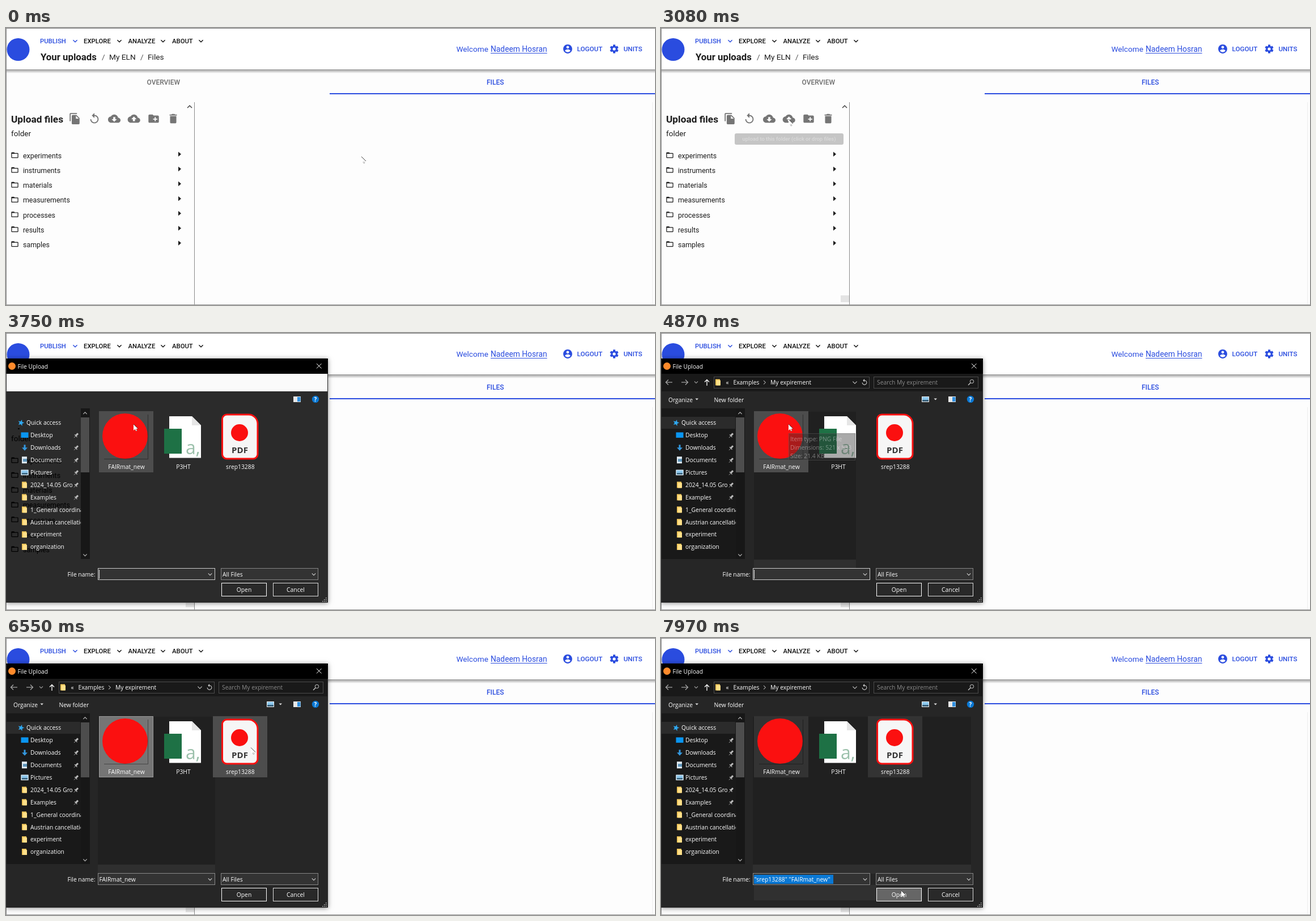
Animation of 1145x489 px, one loop 8000 ms. Source, as an HTML page with a canvas:

```html
<!DOCTYPE html>
<html lang="en">
<head>
<meta charset="utf-8">
<title>File upload</title>
<style>
html, body { margin: 0; width: 100%; height: 100%; overflow: hidden; background: #fdfdfd; }
canvas { display: block; }
</style>
</head>
<body>
<canvas id="stage" width="1145" height="489"></canvas>
<script>
const c = document.getElementById('stage').getContext('2d');
const LOOP = 8000, BLUE = '#2a4cdf', INK = '#1c1c1c', GREY = '#757575';
const start = performance.now();

// ---------- drawing helpers ----------
function box(x, y, w, h, fill, line, lw = 1) {
  if (fill) { c.fillStyle = fill; c.fillRect(x, y, w, h); }
  if (line) { c.strokeStyle = line; c.lineWidth = lw; c.strokeRect(x + .5, y + .5, w - 1, h - 1); }
}
function text(s, x, y, size, color, weight = 400, family = 'Roboto', align = 'left') {
  c.font = `${weight} ${size}px ${family}, sans-serif`;
  c.fillStyle = color;
  c.textAlign = align;
  c.fillText(s, x, y);
}
const ui = (s, x, y, color = '#fff', align = 'left') => text(s, x, y, 10.3, color, 400, '"Open Sans"', align);
function dot(x, y, r, fill) {
  c.fillStyle = fill;
  c.beginPath();
  c.arc(x, y, r, 0, 7);
  c.fill();
}
function line(points, color, lw = 1) {
  c.strokeStyle = color;
  c.lineWidth = lw;
  c.beginPath();
  for (let i = 0; i < points.length; i += 2) c.lineTo(points[i], points[i + 1]);
  c.stroke();
}
function poly(points, fill) {
  c.fillStyle = fill;
  c.beginPath();
  for (let i = 0; i < points.length; i += 2) c.lineTo(points[i], points[i + 1]);
  c.fill();
}
function chevron(x, y, color, r = 3.5, dir = 1, lw = 1.1) {
  line([x - r, y - dir * r / 2, x, y + dir * r / 2, x + r, y - dir * r / 2], color, lw);
}
// Shape on a 24-unit grid, centred at x, y
function icon(shape, x, y, scale, color) {
  c.save();
  c.translate(x, y);
  c.scale(scale, scale);
  c.translate(-12, -12);
  c.fillStyle = color;
  c.fill(shape, 'evenodd');
  c.restore();
}
function clipped(x, y, w, h, draw) {
  c.save();
  c.beginPath();
  c.rect(x, y, w, h);
  c.clip();
  draw();
  c.restore();
}

const CLOUD = 'M19.35 10.04C18.67 6.59 15.64 4 12 4 9.11 4 6.6 5.64 5.35 8.04 2.34 8.36 0 10.91 0 14c0 3.31 2.69 6 6 6h13c2.76 0 5-2.24 5-5 0-2.64-2.05-4.78-4.65-4.96z';
const FOLDER = 'M20 6h-8l-2-2H4c-1.1 0-2 .9-2 2v12c0 1.1.9 2 2 2h16c1.1 0 2-.9 2-2V8c0-1.1-.9-2-2-2z';
const REPLAY = new Path2D('M12 5V1L7 6l5 5V7c3.31 0 6 2.69 6 6s-2.69 6-6 6-6-2.69-6-6H4c0 4.42 3.58 8 8 8s8-3.58 8-8-3.58-8-8-8z');
const FOLDER_LINE = new Path2D(FOLDER + 'M20 18H4V8h16v10z');
const PERSON = new Path2D('M12 2C6.48 2 2 6.48 2 12s4.48 10 10 10 10-4.48 10-10S17.52 2 12 2zm0 3c1.66 0 3 1.34 3 3s-1.34 3-3 3-3-1.34-3-3 1.34-3 3-3zm0 14.2c-2.5 0-4.71-1.28-6-3.22.03-1.99 4-3.08 6-3.08 1.99 0 5.97 1.09 6 3.08-1.29 1.94-3.5 3.22-6 3.22z');
const TOOLS = [
  new Path2D('M16 1H4c-1.1 0-2 .9-2 2v14h2V3h12V1zM15 5l6 6v10c0 1.1-.9 2-2 2H8c-1.1 0-2-.9-2-2V7c0-1.1.9-2 2-2h7zM14 12h5.5L14 6.5V12z'),
  REPLAY,
  new Path2D(CLOUD + 'M17 13l-5 5-5-5h3V9h4v4h3z'),
  new Path2D(CLOUD + 'M14 13v4h-4v-4H7l5-5 5 5h-3z'),
  new Path2D(FOLDER + 'M19 14h-3v3h-2v-3h-3v-2h3V9h2v3h3v2z'),
  new Path2D('M6 19c0 1.1.9 2 2 2h8c1.1 0 2-.9 2-2V7H6v12zM19 4h-3.5l-1-1h-5l-1 1H5v2h14V4z')
];

// ---------- web page ----------
function folderList(ink = INK) {
  text('Upload files', 9, 167, 17.3, ink, 600);
  text('folder', 9, 191, 13.5, ink);
  ['experiments', 'instruments', 'materials', 'measurements', 'processes', 'results', 'samples'].forEach((name, i) => {
    const y = 224.5 + 26.15 * i;
    icon(FOLDER_LINE, 15.5, y, .62, ink);
    text(name, 30, y + 5.5, 12.4, ink);
    poly([304, y - 6, 309, y - 1.8, 304, y + 2.5], ink);
  });
}

function page(t) {
  box(0, 0, 1145, 489, '#fdfdfd');
  box(0, 0, 1145, 73, '#fff');
  const shade = c.createLinearGradient(0, 73, 0, 80);
  shade.addColorStop(0, '#999');
  shade.addColorStop(1, '#fdfdfd');
  box(0, 73, 1145, 7, shade);

  dot(21.5, 38, 20, BLUE);
  [['PUBLISH', 60, 122], ['EXPLORE', 137, 200], ['ANALYZE', 215.5, 277], ['ABOUT', 293, 344]].forEach(([s, x, cx], i) => {
    const color = i ? '#111' : BLUE;
    text(s, x, 27, 11.3, color, 500);
    chevron(cx, 23, color, 3.6, 1, 1.4);
  });
  text('Your uploads', 61, 57, 16.8, INK, 600);
  text('/', 169, 55.5, 13.7, '#555');
  text('My ELN', 182, 55.5, 13.7, INK);
  text('/', 237, 55.5, 13.7, '#555');
  text('Files', 250, 55.5, 13.7, INK);

  text('Welcome', 794.5, 42, 13.6, BLUE);
  const user = 'Nadeem Hosran';
  text(user, 855, 42, 13.8, BLUE);
  box(855, 44, c.measureText(user).width, 1, BLUE);
  icon(PERSON, 991, 37, .79, BLUE);
  text('LOGOUT', 1007.5, 41.2, 11.7, BLUE, 500);
  for (let i = 0; i < 6; i++) {
    const a = i * Math.PI / 3 + Math.PI / 6, dx = Math.cos(a), dy = Math.sin(a);
    line([1073 + 4 * dx, 37 + 4 * dy, 1073 + 7.6 * dx, 37 + 7.6 * dy], BLUE, 4);
  }
  dot(1073, 37, 5.7, BLUE);
  dot(1073, 37, 2.6, '#fff');
  text('UNITS', 1089.5, 41.2, 11.7, BLUE, 500);

  text('OVERVIEW', 248.5, 100, 12, '#6b6b6b', 500);
  text('FILES', 848, 100, 12, BLUE, 500);
  box(571, 115, 574, 2, BLUE);

  box(332, 131, 1, 357, '#8a8a8a');
  box(1140, 131, 1, 357, '#eee');
  chevron(324, 139, '#444', 4, -1, 1.5);
  if (t >= 3080) box(317, 472, 15, 12, '#e4e4e4');
  else if (t >= 1526) box(317, 181, 14, 12, '#efefef');
  [121.5, 156, 191, 225.7, 260.5, 295].forEach((x, i) => icon(TOOLS[i], x, 160, .92, GREY));
  folderList();

  box(0, 0, 1145, 1, '#777');
  box(0, 0, 1, 489, '#888');
  box(0, 488, 1145, 1, '#999');
}

// ---------- dialog ----------
function opening() {
  box(1, 49, 562, 424, null, 'rgba(0,0,0,.25)', 2);
  box(2, 49, 560, 26, 'rgba(0,0,0,.59)');
  box(2, 75, 560, 59, 'rgba(255,255,255,.75)');
  box(150, 134, 411, 262, 'rgba(255,255,255,.7)');
  box(2, 134, 148, 262, 'rgba(0,0,0,.53)');
  box(134, 134, 16, 240, 'rgba(255,255,255,.15)');
  box(2, 396, 560, 75, 'rgba(0,0,0,.46)');
  chevron(142, 143, '#ddd', 3, -1);
  chevron(142, 389, '#ddd', 3);
  box(112, 415, 47, 14, '#fff');
  box(164, 412, 203, 20, '#fff');
  box(377, 412, 169, 20, '#fff');
  box(377, 437, 79, 23, '#fff');
  box(467, 437, 79, 23, '#fff');
  box(545, 456, 16, 15, '#fff');
  dot(15.5, 62, 6.5, '#ff8a2b');
  ui('File Upload', 25.5, 66, '#f4f4f4');
  line([542, 58, 551, 67], '#eee');
  line([551, 58, 542, 67], '#eee');
}

function smallFolder(x, y) {
  box(x, y - 5.5, 8, 11, '#f0c65a');
  box(x + 2, y - 3.5, 7, 9, '#ffe08a');
}

function addressBar() {
  box(1, 72, 566, 31, '#191919');
  line([13, 82.5, 8.5, 87, 13, 91.5], '#aaa', 1.2);
  line([8.5, 87, 20, 87], '#aaa', 1.2);
  line([43, 82.5, 47.5, 87, 43, 91.5], '#aaa', 1.2);
  line([36, 87, 47.5, 87], '#aaa', 1.2);
  chevron(62, 87, '#999', 3);
  line([77, 86.5, 81, 82.5, 85, 86.5], '#fff', 1.3);
  line([81, 82.5, 81, 93], '#fff', 1.3);
  box(93, 77, 275, 21, '#191919', '#4c4c4c');
  smallFolder(96, 87);
  ui('«', 114.5, 90.5);
  ui('Examples', 127.5, 91);
  line([181, 84, 184.5, 87.3, 181, 90.5], '#ddd');
  ui('My expirement', 193, 91);
  chevron(342, 87.5, '#ccc', 3.6);
  icon(REPLAY, 359, 87, .55, '#ccc');
  box(375, 77, 185, 21, '#191919', '#4c4c4c');
  ui('Search My expirement', 381, 91, '#8a8a8a');
  c.strokeStyle = '#ccc';
  c.beginPath();
  c.arc(548.5, 85.5, 3.2, 0, 7);
  c.stroke();
  line([546, 88, 542, 92], '#ccc', 1.3);

  ui('Organize', 13, 121.5);
  poly([60.5, 115.5, 66, 115.5, 63.2, 118.5], '#ddd');
  ui('New folder', 93.5, 121.5);
  box(460, 112, 13, 10, '#8cc8ee', '#eee');
  box(461, 118, 11, 3, '#38607a');
  poly([481.5, 115.5, 487, 115.5, 484.2, 118.5], '#ddd');
}

const PLACES = ['Quick access', 'Desktop', 'Downloads', 'Documents', 'Pictures', '2024_14.05 Gro', 'Examples',
  '1_General coordination', 'Austrian cancellation', 'experiment', 'organization'];

function sidebar(early) {
  box(1, 133, 147, 266, early ? '#2b2b2b' : '#191919');
  if (early) clipped(1, 168, 131, 231, () => folderList('#000'));
  else box(1, 148, 130, 21, '#2b2b2b');
  box(132, 133, 16, 266, '#171717');
  box(132, 149, 15, 97, '#4d4d4d');
  chevron(139.5, 141.5, '#bbb', 3.2, -1);
  chevron(139.5, 392, '#bbb', 3.2);
  PLACES.forEach((name, i) => {
    const y = 158.5 + 21.9 * i;
    if (!i) {
      const star = [];
      for (let k = 0; k < 10; k++) {
        const a = k * Math.PI / 5 - 1.3, r = k % 2 ? 2.5 : 5.8;
        star.push(26.5 + r * Math.cos(a), y + r * Math.sin(a));
      }
      poly(star, '#2fa8f0');
    } else if (i == 1) box(26.5, y - 5, 13, 9.5, '#0a95f0');
    else if (i == 2) {
      box(31.5, y - 5, 3, 6, '#3497dd');
      poly([28, y, 38, y, 33, y + 5.5], '#3497dd');
    } else if (i == 3) {
      box(28, y - 6, 9, 12, '#dfe9f0');
      box(30, y - 2, 7, 5, '#5d93b8');
    } else if (i == 4) {
      box(26.5, y - 4.5, 13, 9.5, '#8cc8ee', '#eee');
      box(28, y + 1, 10, 2.5, '#38607a');
    } else smallFolder(28, y);
    const pinned = i > 0 && i < 7;
    clipped(0, y - 11, pinned ? 117 : 132, 22, () => ui(name, i ? 43 : 36, y + 3.8));
    if (pinned) {
      line([120, y + 4.5, 123, y + 1.5], '#aaa');
      line([121, y - 1, 125.5, y + 3.5], '#bbb', 1.3);
      line([123, y + 1, 127, y - 3], '#bbb', 3);
    }
  });
}

function files({ hover, picked, done }) {
  [164, 264, 365].forEach((x, i) => {
    const fill = picked[i] ? (done ? '#333' : '#757575') : hover == i ? '#4d4d4d' : null;
    if (fill) box(x, 138, 96, 108, fill, picked[i] && !done ? '#999' : null);
  });

  line([250.5, 144, 250.5, 222.5, 173, 222.5], 'rgba(0,0,0,.4)');
  dot(210, 182, 40, '#fb1010');

  poly([288, 147, 328, 147, 344, 163, 344, 220.5, 288, 220.5], '#fff');
  poly([328, 147, 344, 163, 328, 163], '#e6e6e6');
  text('a,', 317, 214, 32, '#9bc0ab', 400, '"Open Sans"');
  box(279, 169, 31, 44, '#1e7145');

  c.beginPath();
  c.roundRect(381.5, 144, 62.5, 78, [8, 16, 8, 8]);
  c.fillStyle = '#f6f6f6';
  c.fill();
  c.strokeStyle = '#fb1010';
  c.lineWidth = 3;
  c.stroke();
  dot(412, 176, 15, '#fb1010');
  text('PDF', 412.5, 211.5, 15, '#333', 700, '"Open Sans"', 'center');

  ['FAIRmat_new', 'P3HT', 'srep13288'].forEach((n, i) => ui(n, 212.5 + 100.4 * i, 239.5, '#fff', 'center'));
}

function hint(alpha) {
  c.save();
  c.globalAlpha = alpha;
  box(225, 177, 118, 48, '#2b2b2b', '#666');
  ['Item type: PNG File', 'Dimensions: 521 x 533', 'Size: 21.4 KB'].forEach((s, i) => ui(s, 228, 190.5 + 15.2 * i));
  c.restore();
}

function dialog(s) {
  const { t, early, x, y } = s;
  const over = (bx, by, w, h) => x >= bx && x < bx + w && y >= by && y < by + h;
  c.save();
  c.shadowColor = 'rgba(0,0,0,.45)';
  c.shadowBlur = 8;
  c.shadowOffsetY = 1;
  box(0, 45, 568, 431, early ? '#2b2b2b' : '#262626');
  c.shadowColor = 'transparent';
  box(1, 45, 567, 27, '#000');
  dot(10.5, 58.5, 6.5, '#ff8a2b');
  ui('File Upload', 20.5, 62.5);
  line([548, 54, 556.5, 62.5], '#fff');
  line([556.5, 54, 548, 62.5], '#fff');

  if (early) box(1, 72, 566, 31, '#fafafa');
  else addressBar();
  box(507, 112, 13, 10, '#e8e8e8');
  box(514, 113, 5.5, 8, '#2f8fe0');
  dot(546, 117, 6.2, '#0a78d4');
  text('?', 546, 120.7, 10, '#fff', 700, '"Open Sans"', 'center');
  sidebar(early);

  // shaded part of the list grows with each interaction
  if (t >= 4870) {
    const [left, right] = t < 5420 ? [164, 344] : t < 6870 ? [162, 369] : [162, 547];
    box(left, 139, right - left, 261, '#202020');
    box(left, 400, right - left, 16, '#2f2f2f');
    if (t >= 6870) box(164, 436, 216, 27, '#303030');
  }
  files(s);

  ui('File name:', 157.5, 429.8, '#fff', 'right');
  box(162, 415, 207, 21, '#333', s.name ? '#8a8a8a' : '#ccc');
  if (s.done) box(164, 418, 140, 16, '#0a78d4');
  ui(s.name, 164.5, 430);
  if (s.caret) box(164, 418, 1, 16, '#eee');
  chevron(360, 426, '#ccc', 3.2);
  box(379, 415, 172, 21, over(379, 415, 172, 21) ? '#454545' : '#333', '#858585');
  ui('All Files', 382, 430);
  chevron(543, 426, '#ccc', 3.2);
  box(380, 441, 80, 24, s.done ? '#666' : over(380, 441, 80, 24) ? '#454545' : '#292929', '#fff');
  ui('Open', 420, 457, '#fff', 'center');
  box(471, 441, 80, 24, '#292929', '#ddd');
  ui('Cancel', 511, 457, '#fff', 'center');
  for (let i = 0; i < 3; i++)
    for (let j = 0; j <= i; j++) box(564 - 3 * j, 467 + 3 * i, 1.5, 1.5, '#bbb');

  if (t >= 4870 && t < 5420) hint(t < 5020 ? .4 : 1);
  c.restore();
}

function pointer(x, y) {
  c.save();
  c.translate(x, y);
  poly([0, 0, 0, 11, 2.6, 8.6, 4.3, 12, 6, 11.2, 4.5, 8, 8, 8], '#fff');
  line([0, 0, 8, 8], '#444');
  line([2.8, 9, 4.3, 12, 6, 11.2, 4.7, 8.4], '#999', .8);
  c.restore();
}

// ---------- timing ----------
// Number of steps taken at t; the first falls on t0, the last on t1
function steps(t, t0, t1, n) {
  return t < t0 ? 0 : Math.min(n, Math.floor((t - t0) * (n - 1) / (t1 - t0) + 1e-6) + 1);
}
const ease = p => p * p * (3 - 2 * p);
const clamp = p => Math.max(0, Math.min(1, p));

function cursorAt(t) {
  const stops = [[627, 227], [279.5, 180], [225, 161], [432, 193.5], [424, 446]];
  const parts = [
    steps(t, 840, 1800, 8) / 8,
    clamp(steps(t, 1930, 2650, 6) / 3),
    steps(t, 6120, 6550, 4) / 4,
    clamp((steps(t, 6870, 7830, 8) - 1) / 7)
  ];
  let [x, y] = stops[0];
  parts.forEach((p, i) => {
    x += (stops[i + 1][0] - stops[i][0]) * ease(p);
    y += (stops[i + 1][1] - stops[i][1]) * ease(p);
  });
  return [x, y];
}

function uploadTip(t) {
  const alpha = t < 3080 ? clamp((steps(t, 1930, 2650, 6) - 3) / 3) : t < 3240 ? .4 : 0;
  if (!alpha) return;
  c.save();
  c.globalAlpha = alpha * .9;
  c.beginPath();
  c.roundRect(130, 186, 192, 20, 3);
  c.fillStyle = '#616161';
  c.fill();
  text('upload to this folder (click or drop files)', 226, 199, 9.4, '#fff', 500, 'Roboto', 'center');
  c.restore();
}

function draw() {
  const t = (performance.now() - start) % LOOP;
  const [x, y] = cursorAt(t);
  page(t);
  uploadTip(t);
  if (t >= 3600 && t < 3750) opening();
  if (t >= 3750) dialog({
    t, x, y,
    early: t < 3880,
    done: t >= 7970,
    hover: y < 138 || y > 245 ? -1 : x < 260 ? 0 : x >= 365 ? 2 : x >= 264 && x < 360 ? 1 : -1,
    picked: [t >= 5560, false, t >= 6870],
    caret: t < 4310 || (t >= 4870 && t < 5420),
    name: t >= 6870 ? '"srep13288" "FAIRmat_new"' : t >= 5560 ? 'FAIRmat_new' : ''
  });
  pointer(x, y);
  requestAnimationFrame(draw);
}
draw();
</script>
</body>
</html>
```
